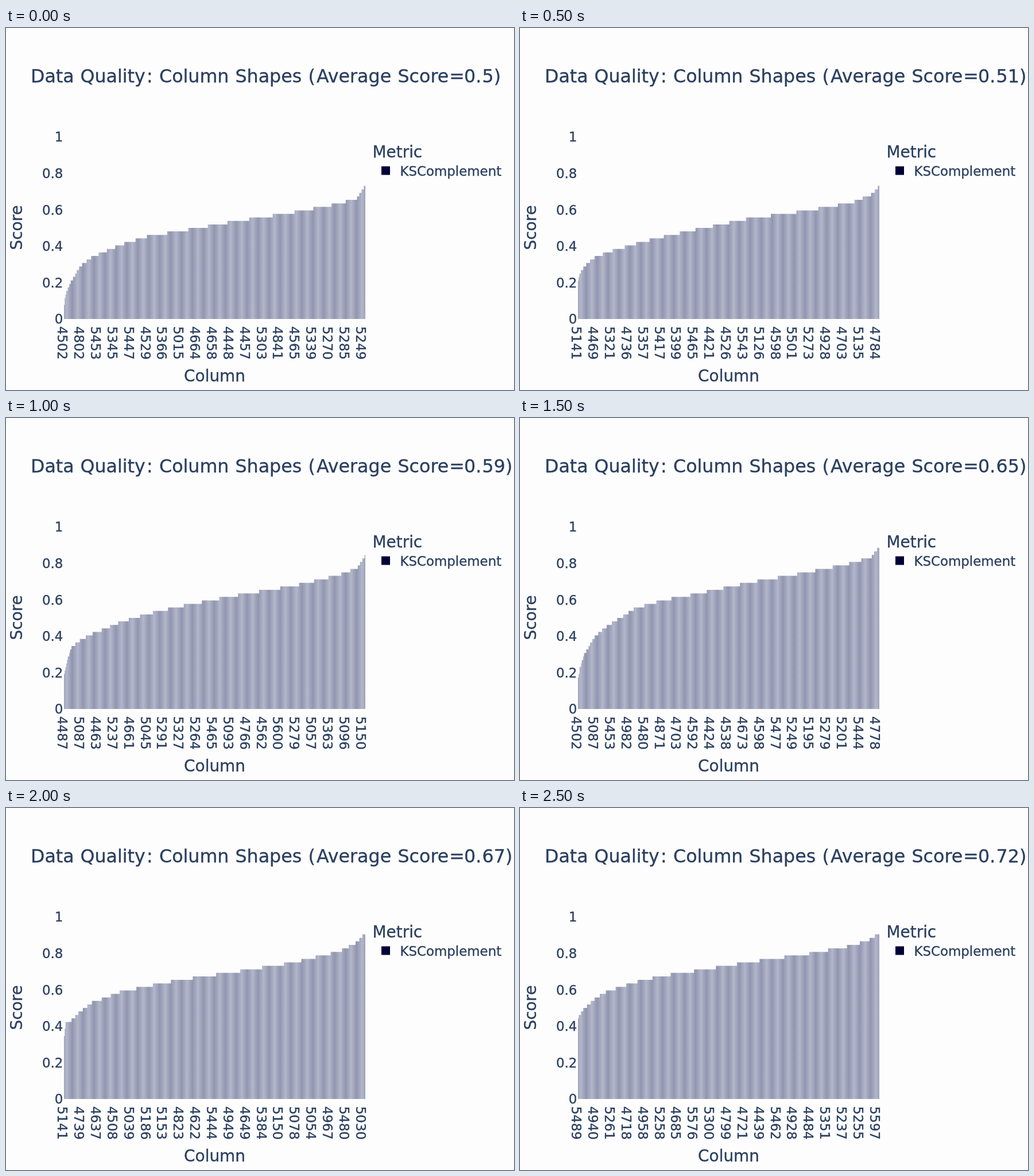
An HTML page for the animation above (3 s loop, 885 px wide and 632 px high).

```html
<!DOCTYPE html>
<html lang="en">
<head>
<meta charset="utf-8">
<style>
  html, body { margin: 0; width: 100%; height: 100%; overflow: hidden; background: #fdfdfd; }
  svg { display: block; width: 885px; height: 632px; }
  text { font: 22.9px "DejaVu Sans", Verdana, sans-serif; fill: #2a3f5f; stroke: #2a3f5f; stroke-width: .35px; }
  .title { font-size: 31.7px; }
  .heading { font-size: 27.9px; }
  .middle { text-anchor: middle; }
  .end { text-anchor: end; }
</style>
</head>
<body>
<svg viewBox="0 0 885 632">
  <defs>
    <linearGradient id="stripes" gradientUnits="userSpaceOnUse" x1="115.4" x2="134.45" y1="0" y2="0" spreadMethod="repeat">
      <stop offset="0" stop-color="#9195af"/>
      <stop offset=".5" stop-color="#b3b7ca"/>
      <stop offset="1" stop-color="#9195af"/>
    </linearGradient>
  </defs>
  <path id="bars" fill="url(#stripes)"/>
  <text class="heading middle" x="363.5" y="617">Column</text>
  <text class="heading middle" transform="translate(28 348.5) rotate(-90)">Score</text>
  <text class="heading" x="638.5" y="225.5">Metric</text>
  <rect x="654" y="241.5" width="15" height="15" fill="#000036"/>
  <text x="686.5" y="258">KSComplement</text>
</svg>
<script>
const LEFT = 101, RIGHT = 626, BASE = 508, HEIGHT = 318, LEVELS = 52, BARS = 400, HOLD = 500;

// Sorted scores, in 1/52 steps, as a curve through a few points at these places.
const knots = [LEFT, 104, 112, 130, 150, 200, 250, 300, 400, 500, 580, 612, RIGHT];
const scenes = [
  { average: "0.5", curve: [3, 7.1, 10.3, 15.2, 17.7, 21.2, 23.7, 25, 27.9, 30.4, 32.9, 34.5, 38],
    columns: "4502 4802 5453 5345 5447 4529 5366 5015 4664 4658 4448 4457 5303 4841 4565 5339 5270 5285 5249" },
  { average: "0.51", curve: [11, 13, 15.1, 17.6, 18.9, 21.4, 23.5, 25.3, 28.7, 30.9, 33.3, 35.5, 38],
    columns: "5141 4469 5321 4736 5357 5417 5399 5465 4421 4526 5543 5126 4598 5501 5273 4928 4703 5135 4784" },
  { average: "0.59", curve: [9, 11.5, 17.2, 19.8, 21.4, 24.8, 27.3, 29.2, 32.4, 35.1, 38.2, 40.3, 44],
    columns: "4487 5087 4463 5237 4661 5045 5291 5327 5264 5465 5093 4766 4562 5600 5279 5057 5363 5096 5150" },
  { average: "0.65", curve: [8, 11.5, 15.5, 20.7, 23.4, 28.7, 31.1, 32.6, 36.1, 39, 41.7, 43.4, 46.4],
    columns: "4502 5087 5453 4982 5480 4871 4703 4592 4424 4538 4673 4598 5477 5249 5195 5279 5201 5444 4778" },
  { average: "0.67", curve: [17, 21.5, 22.1, 25.1, 27.5, 30.6, 32.3, 33.9, 36.3, 38.9, 42.1, 44.8, 47.4],
    columns: "5141 4739 4637 4508 5039 5186 5153 4823 4622 5444 4949 4649 5384 5150 5078 5054 4967 5480 5030" },
  { average: "0.72", curve: [23, 24.1, 25.8, 28.5, 30.6, 33.3, 35.2, 36.4, 39.1, 41.4, 43.8, 45.7, 47.4],
    columns: "5489 4940 5261 4718 4958 5258 4685 5576 5300 4799 4721 4439 5462 4928 4484 5351 5237 5255 5597" }
];

const svg = document.querySelector("svg");
const bars = document.getElementById("bars");

function addText(content, x, y, className = "", angle = 0) {
  const node = document.createElementNS(svg.namespaceURI, "text");
  node.textContent = content;
  node.setAttribute("class", className);
  node.setAttribute("transform", `translate(${x} ${y}) rotate(${angle})`);
  return svg.appendChild(node);
}

const titleParts = [["Data", 43], ["Quality", 129.5], [":", 245], ["Column", 267], ["Shapes", 399.5],
  ["(", 526.5], ["Average", 541], ["Score", 682.5], ["=", 772.2], ["0.", 798]];
titleParts.forEach(([word, x]) => addText(word, x, 95, "title"));
const decimals = addText("", 829.6, 95, "title");

["0", "0.2", "0.4", "0.6", "0.8", "1"].forEach((label, i) =>
  addText(label, 99.3, BASE + 8.3 - i * HEIGHT / 5, "end"));
const ticks = Array.from({ length: 19 }, (_, i) => addText("", 90.3 + i * 28.85, 520.8, "", 90));

function levelAt(x, curve) {
  const i = knots.findIndex(knot => knot > x) - 1;
  const part = (x - knots[i]) / (knots[i + 1] - knots[i]);
  return Math.round(curve[i] + (curve[i + 1] - curve[i]) * part);
}

function show({ average, curve, columns }) {
  const width = (RIGHT - LEFT) / BARS;
  let path = `M${LEFT} ${BASE}`;
  for (let i = 0; i < BARS; i++) {
    const level = levelAt(LEFT + (i + 0.5) * width, curve);
    path += `V${BASE - level * HEIGHT / LEVELS}H${LEFT + (i + 1) * width}`;
  }
  bars.setAttribute("d", `${path}V${BASE}Z`);
  decimals.textContent = average.slice(2) + ")";
  columns.split(" ").forEach((name, i) => { ticks[i].textContent = name; });
}

let current;
function draw() {
  const scene = scenes[Math.floor(performance.now() / HOLD) % scenes.length];
  if (scene !== current) show(current = scene);
  requestAnimationFrame(draw);
}
draw();
</script>
</body>
</html>
```
